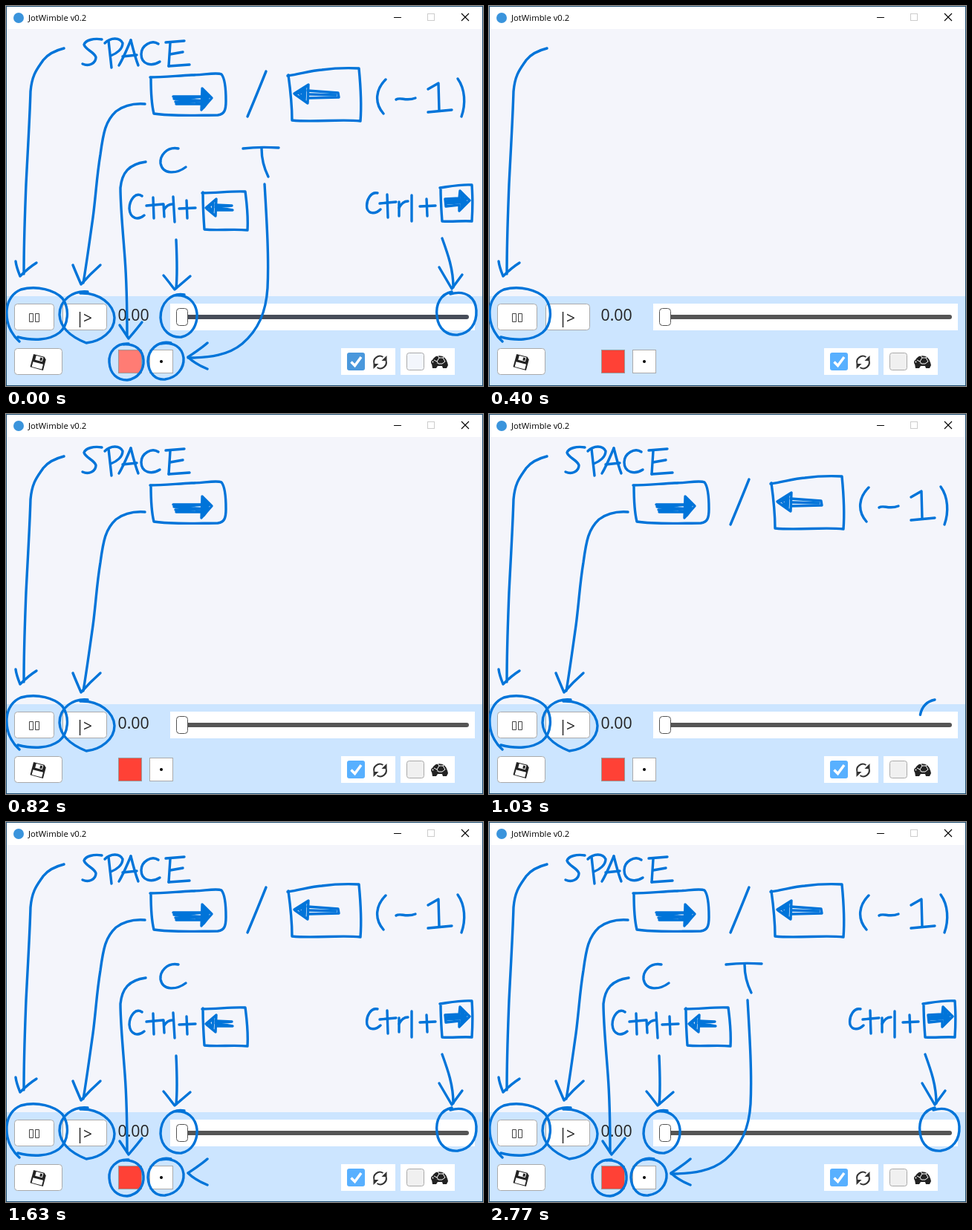
An HTML page for the animation above (2.83 s loop, 642 by 512 pixels).

```html
<!DOCTYPE html>
<html lang="en">
<head>
<meta charset="utf-8">
<title>Shortcut sketch</title>
<style>
html, body { margin: 0; width: 100%; height: 100%; overflow: hidden; background: #f4f5fb; }
svg { display: block; width: 642px; height: 512px; }
text { font-family: "Open Sans", "Noto Sans", sans-serif; fill: #222; }
.btn { fill: #fff; stroke: #aaa; }
.panel { fill: #fff; }
.swatch { fill: #ff4136; stroke: #999; }
.track { fill: #555; }
.tick { fill: #58b0ff; }
.empty { fill: #f0f0f0; stroke: #aaa; }
.idle .swatch { fill: #ff7c74; }
.idle .track { fill: #474d59; }
.idle .tick { fill: #4a98dc; }
.idle .empty { fill: #f3f6fc; }
.line { fill: none; stroke: #444; }
#ink { fill: none; stroke: #0074d9; stroke-width: 3.4; stroke-linecap: round; stroke-linejoin: round; }
</style>
</head>
<body>
<svg id="stage" viewBox="0 0 642 512">
  <rect width="642" height="512" fill="#f4f5fb"/>
  <rect width="642" height="31" fill="#fff"/>
  <rect y="391" width="642" height="121" fill="#cce5ff"/>
  <rect x=".5" y=".5" width="641" height="511" fill="none" stroke="#1f4e73"/>

  <circle cx="17" cy="16" r="7" fill="#3a94dc"/>
  <text x="30" y="20" font-size="11.3" style="fill:#000">JotWimble v0.2</text>
  <path d="M522 15.5H532" stroke="#000"/>
  <rect x="567.5" y="10.5" width="9" height="9" fill="none" stroke="#ccc"/>
  <path d="M613 10L623 20M623 10L613 20" stroke="#000" stroke-width="1.1"/>

  <rect class="btn" x="11.5" y="401.5" width="53" height="35" rx="4"/>
  <path class="line" d="M31.5 414.5h5v11h-5zM39.5 414.5h5v11h-5z"/>
  <rect class="btn" x="76.5" y="401.5" width="59" height="35" rx="4"/>
  <g font-size="21" text-anchor="middle">
    <text x="99.5" y="428">|</text>
    <text x="110" y="428">&gt;</text>
  </g>
  <text x="150.5" y="423.5" font-size="21.3">0.00</text>

  <rect class="panel" x="221" y="401" width="410" height="36"/>
  <rect class="track" x="232" y="416" width="391" height="6" rx="3"/>
  <rect x="229.5" y="407.5" width="15" height="23" rx="4" fill="#fff" stroke="#555"/>

  <rect class="btn" x="11.5" y="461.5" width="64" height="35" rx="4"/>
  <g transform="translate(43.5 480) rotate(15)">
    <path d="M-9-9H6L9-6V9H-9z" fill="#222"/>
    <path d="M-5-8H5V-2H-5zM-7 1H7V8H-7z" fill="#fff"/>
    <path d="M1-7H4V-3H1z" fill="#222"/>
  </g>
  <rect class="swatch" x="151.5" y="463.5" width="31" height="31"/>
  <rect class="btn" x="193.5" y="463.5" width="31" height="31"/>
  <circle cx="209" cy="479" r="2" fill="#000"/>

  <rect class="panel" x="451" y="461" width="73" height="36"/>
  <rect class="tick" x="459" y="467" width="24" height="24" rx="3"/>
  <path d="M464.500 479.500L469.500 484.500L478 473" fill="none" stroke="#fff" stroke-width="3.5"/>
  <g transform="translate(503.500 480)" fill="#333">
    <g id="half">
      <path d="M-8 2A8 8 0 0 1 4-7" fill="none" stroke="#333" stroke-width="2"/>
      <path d="M9-9V-2H2z"/>
    </g>
    <use href="#half" transform="rotate(180)"/>
  </g>
  <rect class="panel" x="531" y="461" width="73" height="36"/>
  <rect class="empty" x="539.5" y="467.5" width="23" height="23" rx="3"/>
  <g fill="#222">
    <path d="M573 481C574 468 592 468 594 481z"/>
    <ellipse cx="576" cy="480" rx="4" ry="3.500"/>
    <path d="M573 482L594 480L595 484L593 488L588 488L587 485L581 485L579 488L574 488z"/>
    <path d="M580 479L583 474L588 474L591 479L587 482L582 482zM583 474L581 471M588 474L590 472M580 479L576 477" fill="none" stroke="#fff"/>
    <circle cx="574.500" cy="479.500" r=".9" fill="#fff"/>
  </g>
  <g id="ink"></g>
</svg>
<script>
// Pen strokes in drawing order; each phase runs at a constant pen speed.
const phases = [
  { from: 100, to: 400, d: `
    M18 452C6 441 0 428 1 410C2 396 10 386 20 382C42 376 66 383 76 394C86 408 84 430 72 440C58 451 36 451 16 446
    M13 344C14 352 17 359 19 364C26 357 33 351 41 346
    M24 361C24 330 25 290 27 240C29 200 32 150 33 115C35 92 42 85 50 73C57 64 66 60 78 57` },
  { from: 400, to: 820, d: `
    M129 45C118 43 107 46 105 52C107 59 119 62 121 69C121 77 112 82 103 78
    M138 47L142 83 M133 50C141 42 153 42 157 50C157 58 149 64 141 67
    M168 46C163 58 158 70 152 80 M168 46C171 58 174 70 178 80 M157 68L176 66
    M205 51C196 45 182 53 182 65C182 79 196 82 207 75
    M215 49L240 47 M221 50L219 81 M221 65L238 62 M219 81L247 79
    M110 385C90 383 72 396 72 416C73 434 88 446 108 454C128 452 146 438 146 420C145 402 126 386 100 387
    M90 349C94 359 98 368 101 375C109 366 118 357 127 349
    M104 373C108 350 112 320 117 285C121 255 122 230 127 200C131 170 134 155 148 142C160 133 174 131 187 132
    M195 96C195 115 196 133 199 145C225 149 260 147 285 147C294 146 296 140 296 128C296 112 295 98 290 92C284 89 265 93 250 93C230 94 210 96 194 96
    M225 122L270 122L226 125L270 128L228 129L268 132L229 132
    M264 111L277 124L263 140L264 112L270 118L267 134L273 122L267 117L266 137L274 127` },
  { from: 820, to: 1330, d: `
    M350 88C342 108 333 130 325 149
    M380 93C383 115 385 140 385 154C415 157 450 152 477 155C479 130 477 105 475 84C455 83 440 84 425 86C410 87 395 92 379 94
    M388 118L407 106L406 131L389 119L403 109L402 127L395 118L400 114L399 123
    M406 114L447 117L448 123L408 124 M408 119L444 120
    M511 99C498 112 495 130 508 145 M525 126C531 122 538 129 551 124
    M568 112L582 104L583 141 M568 143L600 140
    M608 98C618 112 619 132 613 149
    M600 385C585 388 578 402 580 418C582 436 594 444 608 443C624 441 634 428 633 410C632 394 620 382 598 388
    M583 352L600 381L614 362 M602 379C602 355 595 335 587 313
    M500 252C491 250 484 262 486 273C489 281 498 280 504 274
    M513 254L514 285 M503 266L525 264 M529 264L529 283 M529 272C532 266 536 263 541 263
    M546 255L546 290 M557 270L578 269 M566 260L567 283
    M585 245C585 260 586 277 587 290C600 291 615 289 627 290C628 275 628 255 627 241C612 240 598 243 584 245
    M591 260L610 259L611 249L624 262L610 276L610 268L592 270L591 260
    M593 263L620 260L593 266L620 264
    M613 253L613 272L616 256L616 268L619 260
    M240 389C222 386 208 400 208 420C209 438 222 447 236 446C250 443 258 430 257 414C255 398 244 388 226 390
    M212 363C218 370 223 377 227 382C234 376 241 370 248 364
    M229 380C231 360 230 337 229 315
    M183 256C174 250 166 262 166 273C167 287 178 289 186 282` },
  { from: 1330, to: 1630, d: `
    M198 258L199 286 M189 269L211 267 M212 267L213 284 M213 274C216 269 220 267 224 267
    M225 257L227 291 M233 273L255 272 M243 262L244 286
    M265 251C265 270 266 287 267 301C285 303 305 300 325 302C326 285 324 265 322 250C303 249 285 252 264 252
    M269 272L283 260L282 283L270 273L279 265L278 279L274 271
    M282 268L304 269L282 271L305 275L283 275
    M165 455C148 454 138 466 139 480C140 496 150 504 163 504C178 502 186 490 185 477C184 463 174 455 158 456
    M153 430L165 448C171 441 177 434 183 426
    M163 445C163 410 163 380 160 340C157 300 154 270 154 245C156 225 165 213 188 210
    M232 192C216 189 207 202 208 212C211 228 230 226 242 217
    M222 454C204 450 191 464 191 479C192 496 202 504 214 503C230 501 240 488 239 474C237 460 226 452 208 455
    M271 454C262 462 252 468 245 473C252 480 261 485 271 489` },
  { from: 1630, to: 1900, d: `
    M245 474C275 474 300 470 318 455C340 436 350 412 352 380C354 340 351 290 348 240
    M319 192C335 190 350 190 367 191 M344 192C344 205 348 220 353 230` }
];

const LOOP = 2830, INTRO = 50;
const stage = document.getElementById("stage");
const ink = document.getElementById("ink");
const strokes = [];

for (const { from, to, d } of phases) {
  const group = d.trim().split(/\s*(?=M)/).map(data => {
    const path = document.createElementNS("http://www.w3.org/2000/svg", "path");
    path.setAttribute("d", data);
    ink.append(path);
    return { path, length: path.getTotalLength() };
  });
  const speed = group.reduce((sum, s) => sum + s.length, 0) / (to - from);
  let start = from;
  for (const s of group) {
    strokes.push({ ...s, start, speed });
    start += s.length / speed;
  }
}

// Display steps in units of 10 ms.
const steps = [..."566665666555555555666" + "6".repeat(28)].map(n => n * 10);

function snap(time) {
  let at = 0;
  for (const step of steps) {
    if (time < at + step) break;
    at += step;
  }
  return at;
}

function draw(time) {
  const idle = time < INTRO;
  stage.classList.toggle("idle", idle);
  for (const { path, length, start, speed } of strokes) {
    const drawn = idle ? length : Math.min(length, (time - start) * speed);
    path.style.visibility = drawn > 0 ? "visible" : "hidden";
    path.style.strokeDasharray = drawn >= length ? "none" : `${Math.max(0, drawn)} ${length + 9}`;
  }
}

const origin = performance.now();
function tick() {
  draw(snap((performance.now() - origin) % LOOP));
  requestAnimationFrame(tick);
}
tick();
</script>
</body>
</html>
```
